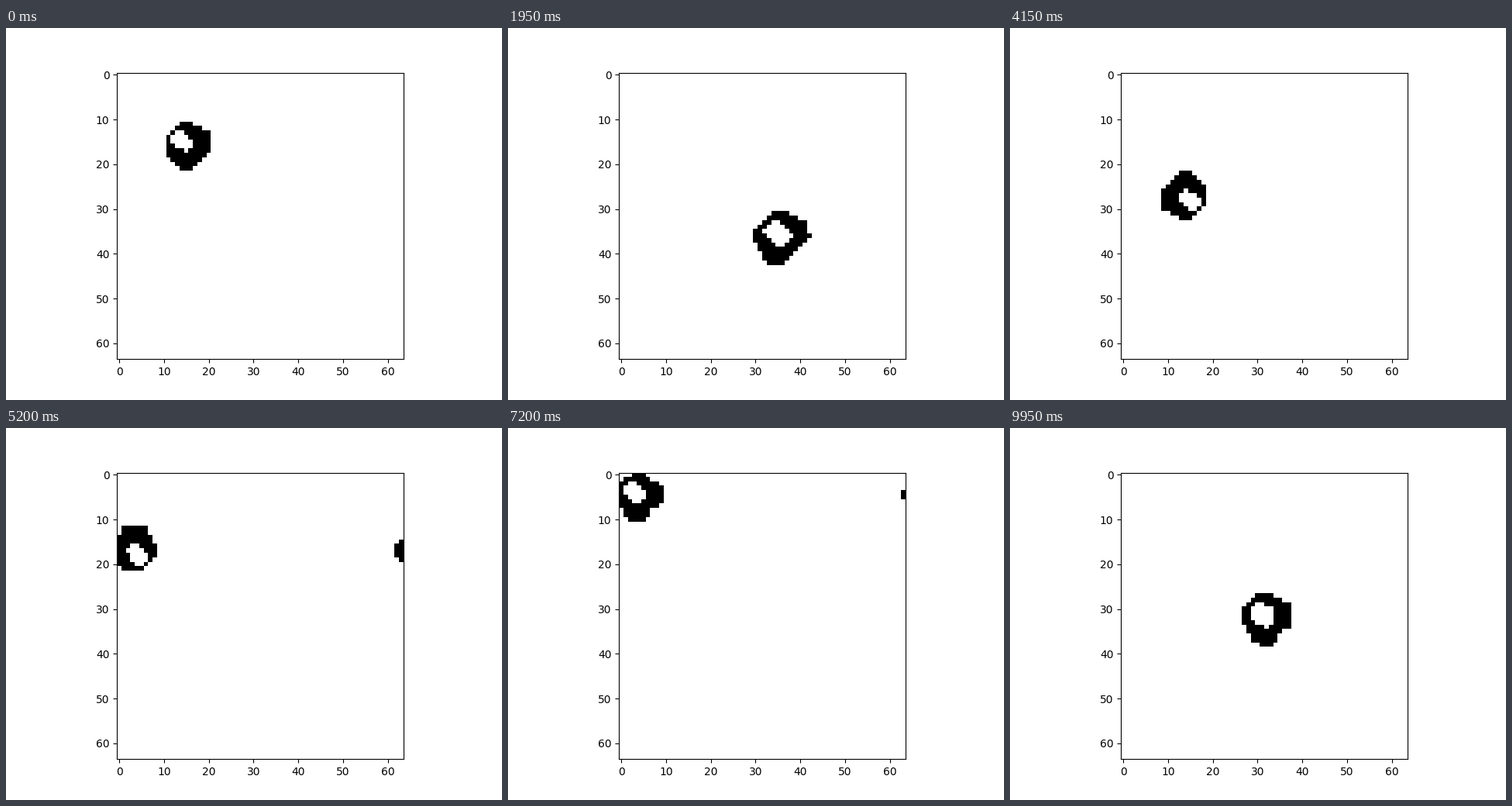
These frames come from a looping animation (640 by 480 pixels, 10000 ms). A matplotlib script:

```python
import numpy as np
import matplotlib.pyplot as plt
from matplotlib.animation import FuncAnimation

SIZE = 64
STEPS = 200
RADIUS = 5
BIRTH = (34, 45)
SURVIVE = (34, 58)
CENTER_X, CENTER_Y = 15, 16


def between(low, value, high):
    return (value >= low) & (value <= high)


def start_grid():
    """A glider: a clipped octagon with a smaller polygon cut out of it."""
    rows, cols = np.indices((SIZE, SIZE))
    x, y = cols - CENTER_X, rows - CENTER_Y
    body = (between(-4, x, 5) & (abs(y) <= 5) & (abs(x + y) <= 6)
            & (y - x <= 6) & (x - 2 * y <= 11))
    hollow = (between(-3, x, 1) & between(-5, x + y, 1)
              & (x - y <= 2) & (2 * y - x <= 2))
    return body & ~hollow


def count_near(grid):
    """Count live cells in the square around each cell, wrapping at the edges."""
    shifts = range(-RADIUS, RADIUS + 1)
    columns = sum(np.roll(grid.astype(int), s, axis=0) for s in shifts)
    return sum(np.roll(columns, s, axis=1) for s in shifts)


def step(grid):
    count = count_near(grid)
    low, high = (np.where(grid, s, b) for s, b in zip(SURVIVE, BIRTH))
    return between(low, count, high)


history = [start_grid()]
while len(history) < STEPS:
    history.append(step(history[-1]))

fig, ax = plt.subplots(figsize=(6.4, 4.8), dpi=100)
image = ax.imshow(history[0].astype(int), cmap="binary", vmin=0, vmax=1,
                  interpolation="nearest")


def update(i):
    image.set_data(history[i].astype(int))
    return [image]


anim = FuncAnimation(fig, update, frames=STEPS, interval=50,
                     init_func=lambda: update(0), repeat=True, repeat_delay=0)
plt.show()
```
